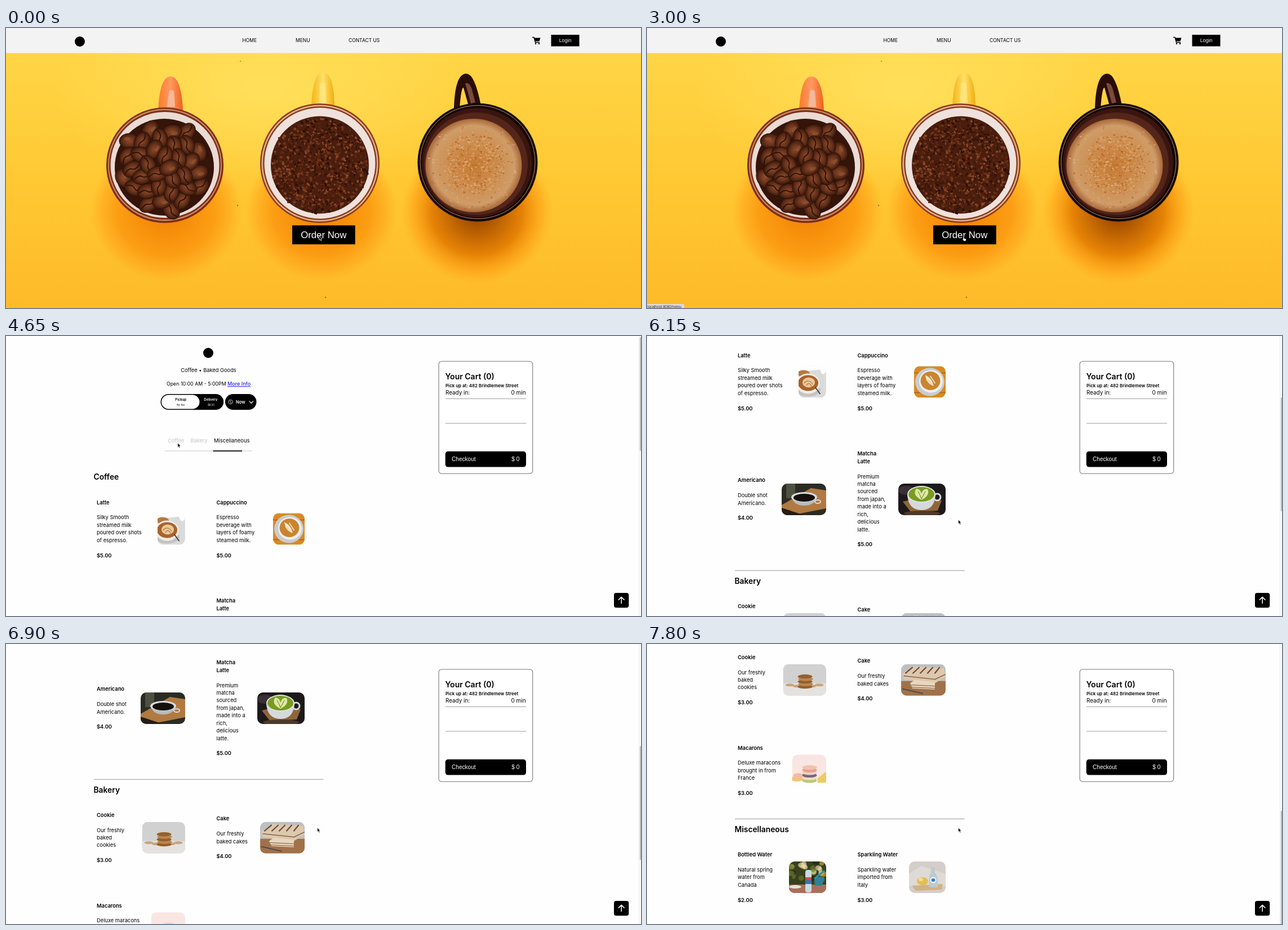
Write an HTML page that moves like this. It is 1127x497 px and loops after 8000 ms.

```html
<!DOCTYPE html>
<html lang="en">
<head>
<meta charset="utf-8">
<title>Coffee shop</title>
<style>
  html, body { margin: 0; width: 100%; height: 100%; overflow: hidden; background: #fefefe; }
  svg { display: block; }
  text { font-family: Inter, "Open Sans", sans-serif; white-space: pre; }
  .b { font-weight: 600; }
  .m { text-anchor: middle; }
  .e { text-anchor: end; }
  .ui { font-family: "Liberation Sans", Arial, sans-serif; }
</style>
</head>
<body>
<svg id="stage" width="1127" height="497" viewBox="0 0 1127 497"></svg>
<script>
const LOOP = 8000, STEP = 150;

let seed = 7;
const rnd = () => (seed = (seed * 16807) % 2147483647) / 2147483647;
const pick = list => list[Math.floor(rnd() * list.length)];
const repeat = (n, make) => Array.from({ length: n }, (_, i) => make(i)).join('');

// Shape helpers; text is placed by its vertical centre.
const rect = (x, y, w, h, fill, r = 0, more = '') =>
  `<rect x="${x}" y="${y}" width="${w}" height="${h}" fill="${fill}" rx="${r}" ${more}/>`;
const oval = (x, y, rx, ry, fill, more = '') =>
  `<ellipse cx="${x}" cy="${y}" rx="${rx}" ry="${ry}" fill="${fill}" ${more}/>`;
const path = (d, fill, more = '') => `<path d="${d}" fill="${fill}" ${more}/>`;
const line = (d, color, width = 1) =>
  path(d, 'none', `stroke="${color}" stroke-width="${width}" stroke-linecap="round" stroke-linejoin="round"`);
const text = (x, y, str, size = 9.3, cls = '', fill = '#000', more = '') =>
  `<text x="${x}" y="${y + size * .36}" font-size="${size}" class="${cls}" fill="${fill}" ${more}>${str}</text>`;
const group = (id, body) => `<g id="${id}">${body}</g>`;
const inDisc = (cx, cy, rx, ry, make) => {
  const a = rnd() * 2 * Math.PI, q = Math.sqrt(rnd());
  return make(cx + rx * q * Math.cos(a), cy + ry * q * Math.sin(a));
};

const gradient = (id, stops) => `<radialGradient id="${id}">${stops.map(([at, color, alpha = 1]) =>
  `<stop offset="${at}" stop-color="${color}" stop-opacity="${alpha}"/>`).join('')}</radialGradient>`;
const defs = `<defs>
  <linearGradient id="wall" x2="0" y2="1"><stop stop-color="#ffd546"/><stop offset=".45" stop-color="#ffca35"/><stop offset="1" stop-color="#feba29"/></linearGradient>
  <linearGradient id="orange"><stop stop-color="#fb7a2c"/><stop offset=".5" stop-color="#ff9a62"/><stop offset="1" stop-color="#f0601c"/></linearGradient>
  <linearGradient id="yellow"><stop stop-color="#f4b413"/><stop offset=".5" stop-color="#ffe069"/><stop offset="1" stop-color="#f2ac0c"/></linearGradient>
  ${gradient('glow', [[0, '#ffe463', .75], [1, '#ffe463', 0]])}
  ${gradient('shade', [[0, '#ef7a00', .95], [.65, '#fb950d', .8], [.85, '#ffa41a', .55], [1, '#ffae20', 0]])}
  ${gradient('darkShade', [[0, '#8a3b00'], [.6, '#e37b00', .9], [.85, '#ff9f14', .55], [1, '#ffae20', 0]])}
  ${gradient('foam', [[0, '#c67a34'], [.5, '#cc8d50'], [.85, '#cf9c68'], [1, '#a8683a']])}
  ${gradient('bean', [[0, '#8b4a2a'], [.6, '#64301a'], [1, '#3a180b']])}
</defs>`;

function bean(i) {
  const a = i * 2.4, q = 78 * Math.sqrt((i + .5) / 34);
  const x = 280 + q * Math.cos(a), y = 248 + q * Math.sin(a);
  return `<g transform="translate(${x} ${y}) rotate(${rnd() * 180})">` +
    oval(0, 0, 18, 13.5, 'url(#bean)', 'stroke="#2b1007" stroke-width=".8"') +
    (rnd() < .6 ? line('M-15 1Q-5 -5 0 0T15 -1', '#2b1007', 1.8) : oval(-4, -4, 6, 3, '#a5633f', 'opacity=".45"')) + '</g>';
}

const dot = (x, y) => oval(x, y, .6 + rnd() * 1.8, .6 + rnd() * 1.2, pick(['#e0a45f', '#b5651f', '#dfb387', '#c47a2c']), 'opacity=".75"');
const crumb = (x, y) => rect(x, y, 1.5 + rnd() * 4, 1.5 + rnd() * 3, pick(['#3a170b', '#5d2711', '#74351a', '#8d4826', '#2c1008']), 0,
  `transform="rotate(${rnd() * 90} ${x} ${y})"`);

const photoWall = rect(0, 44, 1127, 453, 'url(#wall)') +
  oval(460, 110, 380, 180, 'url(#glow)') +
  oval(284, 325, 135, 125, 'url(#shade)') + oval(560, 325, 135, 125, 'url(#shade)') + oval(836, 325, 135, 130, 'url(#darkShade)') +
  oval(416, 59, 1, 1, '#a67b1c') + oval(411, 315, 1, 1, '#7a4a10') + oval(567, 478, 1, 1, '#7a4a10');

const beansCup = path('M270 146Q273 86 292 86T314 146Z', 'url(#orange)') +
  path('M286 140L289 112Q293 108 298 112L300 140Z', '#f5b89a') +
  oval(282, 243.5, 104, 102.5, '#7c2d14') + oval(282, 243, 101, 99.5, '#c98a66') + oval(282, 243, 99, 97, '#7c2d14') +
  oval(282, 243, 96.5, 94, '#eadbd5') + oval(281, 247, 88, 86, '#35140a') + repeat(34, i => bean(33 - i));

const groundsCup = path('M542 140Q544 79 563 79T583 140Z', 'url(#yellow)') +
  path('M555 136L557 98Q562 93 567 98L569 136Z', '#ffe98c', 'opacity=".6"') +
  oval(557, 240, 106, 106, '#8b3a18') + oval(557, 240, 103.5, 103.5, '#e2b493') + oval(557, 240, 101, 101, '#8b3a18') +
  oval(557, 240, 98.5, 98.5, '#efe2dc') + oval(557, 243, 87, 86.5, '#4a1e0e') +
  repeat(1100, () => inDisc(556, 242, 85, 84, crumb));

const creamCup = path('M795 142Q797 81 817 81Q832 81 843 138L822 142L812 106Q808 104 805 142Z', '#2a0d08') +
  path('M815 98Q822 96 826 106L833 132L825 134Z', '#7b4a3c') +
  oval(837, 238.5, 106.5, 105, '#160706') + oval(837, 238, 102, 100.5, 'none', 'stroke="#b58a78" stroke-width="1"') +
  oval(836, 239, 98, 97, '#3a1510') + oval(834, 241, 92, 91, '#54261a') +
  oval(830, 244, 85.5, 83, 'url(#foam)') + repeat(500, () => inDisc(832, 242, 54, 54, dot)) +
  repeat(160, () => inDisc(830, 244, 82, 80, dot));

const cartIcon = line('M934.5 16.5H937L939.5 25.5H946.5', '#000', 1.5) +
  path('M937 17.5H948.5L946.5 23.5H939Z', '#000') + oval(940, 27.8, 1.3, 1.3, '#000') + oval(946, 27.8, 1.3, 1.3, '#000');
const logo = (x, y) => oval(x, y, 9, 9, '#000');

const home = photoWall + beansCup + groundsCup + creamCup +
  rect(0, 0, 1127, 44.5, '#f3f3f3') + logo(131, 24) +
  text(419.5, 22, 'HOME', 8.5) + text(514, 22, 'MENU', 8.5) + text(608, 22, 'CONTACT US', 8.5) +
  cartIcon + rect(967.5, 12, 50, 20.5, '#000') + text(992.5, 22, 'Login', 8.9, 'm ui', '#fff') +
  rect(508, 350.3, 111.7, 33.7, '#000') + text(563.7, 367, 'Order Now', 16.8, 'm ui', '#fff');

let photoCount = 0;
function photo(x, y, w, body) {
  const id = 'clip' + photoCount++;
  return `<clipPath id="${id}">${rect(0, 0, w, 56, '#000', 10)}</clipPath>` +
    `<g transform="translate(${x} ${y})"><g clip-path="url(#${id})">${body}</g></g>`;
}

const latte = rect(0, 0, 49, 56, '#dadadb') + path('M0 0H49V10Q42 20 38 6L20 8L0 10Z', '#fefefe') +
  oval(9, 13, 11, 6, '#b87842') + oval(17, 42, 22, 12, '#c4c3c3') + oval(17, 31, 21, 18, '#f1ece6') +
  oval(17, 30, 18, 14, '#a9632b') + oval(18, 29, 11, 9, '#e9c79c') + line('M10 30Q18 22 25 32M14 34Q19 27 23 36', '#b77639', 1.2) +
  line('M30 38L38 49', '#4a403a', 2);
const cappuccino = rect(0, 0, 56, 56, '#d98a25') + line('M0 12H56M0 47H56', '#a8621a', 1.5) +
  oval(28, 28, 26, 25, '#c9ccd0') + oval(30, 27, 21, 20, '#f0efec') + oval(29, 26, 17.5, 16.5, '#c98530') +
  path('M20 16Q31 20 35 35Q22 32 20 16Z', '#f6e8cc') + line('M29 18L37 30M23 25L33 33', '#f0d9b0', 2);
const americano = rect(0, 0, 79, 56, '#2c2b23') + rect(8, 0, 16, 26, '#4d5140') + path('M0 38L52 8L79 12V44L18 56H0Z', '#b07a42') +
  path('M0 43L40 56H0Z', '#241c16') + path('M18 25Q22 39 40 39T62 25Z', '#b9bbbd') + oval(64, 32, 5, 3, 'none', 'stroke="#dadada" stroke-width="2"') +
  oval(40, 24, 23, 9, '#d9dbdc') + oval(40, 25, 19, 7, '#15100d');
const matcha = rect(0, 0, 84, 56, '#1d191b') + oval(14, 12, 14, 8, '#393036') + path('M8 32L40 24L77 30L70 48L22 50Z', '#8f6538') +
  oval(42, 53, 32, 5, '#4d3928') + path('M16 20Q18 47 41 47T66 20Z', '#d4d9dc') + oval(69, 24, 6, 6, 'none', 'stroke="#d4d9dc" stroke-width="3"') +
  oval(41, 19, 25, 15, '#e0e5e0') + oval(41, 19, 23, 13, '#7a9b22') + path('M41 29Q24 20 32 9Q40 10 41 18Q44 8 52 10Q57 21 41 29Z', '#dce7a9') +
  line('M35 14Q39 20 41 27Q45 20 48 14', '#7a9b22', 1.2);
const cookies = rect(0, 0, 77, 56, '#d1d1d1') + rect(0, 34, 77, 22, '#e4e2df') +
  repeat(5, i => oval(12 + i * 13, 37 + i % 2 * 2, 8, 2.5, '#c9a27d')) +
  repeat(5, i => oval(39 + i % 2, 40 - i * 4.5, 13, 3.6, i % 2 ? '#bd854e' : '#93602f'));
const cake = rect(0, 0, 79, 56, '#bdc0c2') + path('M0 30H79V56H0Z', '#a17149') + path('M2 17L22 4L76 7L79 22L60 34L4 27Z', '#dcc8ad') +
  repeat(5, i => line(`M${8 + i * 13} 16L${20 + i * 12} 6`, '#6f4a37', 2.2)) + line('M5 21L60 27L79 18', '#8b6246', 1.5) +
  path('M16 34L24 28L60 32V45L20 43Z', '#e7d7bf') + line('M18 37L60 39M18 41L60 43', '#956a48', 1.3) + line('M3 44L38 52', '#4a4c54', 2);
const macarons = rect(0, 0, 61, 56, '#f9e5e1') + rect(0, 44, 61, 12, '#fefdfb') + path('M45 43L60 30L61 50H45Z', '#eecb62') +
  oval(9, 43, 12, 5, '#f0c777') + oval(11, 37, 9, 4, '#f4b9a4') +
  ['#b9c779', '#e8dfc4', '#7d6474', '#ead1ca', '#e8a18f', '#f4c0b0'].map((c, i) => oval(31, 46 - i * 4.6, 13, 4, c)).join('');
const bottled = rect(0, 0, 66, 56, '#39401f') + repeat(26, () => oval(rnd() * 66, rnd() * 36, 3 + rnd() * 4, 3 + rnd() * 4,
  pick(['#d3a82b', '#20290f', '#6e7a29', '#ece1b3']), 'opacity=".65"')) + rect(0, 41, 66, 15, '#a8705a') +
  oval(11, 45, 11, 3, '#e6e3df') + path('M45 28H62L59 43H46Z', '#2b829b') + line('M46 30L62 17', '#2f8fa8', 3) +
  rect(29, 15, 11, 40, '#c8dce6', 4) + rect(29, 28, 11, 12, '#d04a43') + rect(30, 33, 9, 7, '#3476a9');
const sparkling = rect(0, 0, 65, 56, '#d3cec9') + path('M0 22L22 8L65 22V44H0Z', '#dedad5') + path('M5 43L60 40L58 50L12 52Z', '#d2b184') +
  oval(24, 35, 10, 7, '#e3bf55') + oval(21, 32, 4, 3, '#f2df91') + path('M39 10H46V20Q52 25 51 46H36Q34 26 39 20Z', '#bdcbd0') +
  oval(43, 33, 5.5, 5.5, '#eef3f4') + oval(43, 33, 3.5, 3, '#3a82bd');

// A card is one run of evenly spaced lines: title, gap, description, gap, price.
function card(x, y, title, about, price) {
  const rows = [...title.split('|').map(s => [s, 'b']), [''], ...about.split('|').map(s => [s, '']), [''], [price, 'b']];
  return rows.map(([s, cls], i) => s && text(x, y + i * 13.42, s, 9.3, cls)).join('');
}
const heading = (y, str) => text(155.5, y, str, 13.8, 'b');
const divider = y => rect(156, y, 407.5, 1, '#999');

const page = logo(359, 30) + text(359.5, 60.5, 'Coffee • Baked Goods', 9.3, 'm') +
  text(285, 85, 'Open 10:00 AM - 5:00PM', 8.8) + text(393, 85, 'More Info', 9.1, '', '#0000ee', 'text-decoration="underline"') +
  rect(274.5, 103, 111.7, 28, '#000', 14) + rect(276, 104.5, 67.5, 25, '#fff', 12.5) +
  text(310.2, 112.5, 'Pickup', 6, 'b m') + text(310.2, 122, 'No fee', 4.4, 'm') +
  text(363.3, 112.5, 'Delivery', 6, 'b m', '#fff') + text(364, 122, '$8.50', 4.4, 'm', '#fff') +
  rect(389, 103, 55.5, 28, '#000', 14) + oval(398.5, 117, 3.8, 3.8, 'none', 'stroke="#fff" stroke-width=".7"') +
  line('M398 114.5V117.5L400 118.5', '#fff', .7) + text(408, 117, 'Now', 7.5, 'b', '#fff') + line('M432 115.8L435.3 119.3L438.6 115.8', '#fff', 1.2) +
  text(287, 185.5, 'Coffee', 9.2, '', '#c4c4c4') + text(327.5, 185.5, 'Bakery', 9.2, '', '#c4c4c4') + text(369, 185.5, 'Miscellaneous', 9.4) +
  rect(281.5, 203.5, 156, 1, '#ccc') + rect(367.5, 203.2, 51.5, 1.7, '#000') +
  heading(250.5, 'Coffee') +
  card(161, 295.3, 'Latte', 'Silky Smooth|streamed milk|poured over shots|of espresso.', '$5.00') + photo(269, 314.5, 48.8, latte) +
  card(373.5, 295.3, 'Cappuccino', 'Espresso|beverage with|layers of foamy|steamed milk.', '$5.00') + photo(474, 314.5, 56, cappuccino) +
  card(161, 517, 'Americano', 'Double shot|Americano.', '$4.00') + photo(239, 523, 79, americano) +
  card(373.5, 470, 'Matcha|Latte', 'Premium|matcha|sourced|from japan,|made into a|rich,|delicious|latte.', '$5.00') + photo(446, 523, 84, matcha) +
  divider(676.8) + heading(695.8, 'Bakery') +
  card(161, 740.4, 'Cookie', 'Our freshly|baked|cookies', '$3.00') + photo(241.5, 752.7, 76.5, cookies) +
  card(373.5, 747, 'Cake', 'Our freshly|baked cakes', '$4.00') + photo(451, 752.7, 79, cake) +
  card(161, 901.3, 'Macarons', 'Deluxe maracons|brought in from|France', '$3.00') + photo(257.5, 913.3, 60.5, macarons) +
  divider(1027) + heading(1046, 'Miscellaneous') +
  card(161, 1090.7, 'Bottled Water', 'Natural spring|water from|Canada', '$2.00') + photo(252, 1103, 66, bottled) +
  card(373.5, 1090.7, 'Sparkling Water', 'Sparkling water|imported from|Italy', '$3.00') + photo(465, 1103, 65, sparkling);

const cart = rect(768.1, 45, 166.6, 199.3, '#fff', 5, 'stroke="#777" stroke-width="1.1"') +
  text(779.5, 72, 'Your Cart (0)', 14, 'b') + text(780, 87.7, 'Pick up at: 482 Brindlemew Street', 7.9, 'b') +
  text(780, 100.7, 'Ready in:', 9.9) + text(922.5, 100.7, '0 min', 9.9, 'e') +
  rect(780, 110.8, 143, 1, '#999') + rect(780, 154.5, 143, 1, '#999') +
  rect(779.7, 204.8, 143.3, 27.8, '#000', 5) + text(791, 218.5, 'Checkout', 10.1, 'ui', '#fff') + text(911.3, 218.5, '$ 0', 10.1, 'e ui', '#fff');

const overlay = rect(1123, 0, 4, 497, '#fafafa') + rect(1122.8, 0, .6, 497, '#e6e6e6') +
  rect(1124.8, 2, 2.2, 202, '#bdbdbd', 1, 'id="thumb"') +
  rect(1079, 456, 26.3, 26.3, '#000', 4) + line('M1092.2 474.5V463.5M1087.3 468.3L1092.2 463.4L1097.1 468.3', '#fff', 1.5);

const status = rect(-2, 490, 68, 9, '#dcdae0', 2, 'id="statusBox"') + text(1, 494.8, 'localhost:8080/menu', 6.5, 'ui', '#333');
const outline = 'stroke-width=".7" stroke-linejoin="round"';
const arrow = path('M0 0V7.8L1.8 6.2L3.2 9.2L4.5 8.6L3.2 5.7H5.5Z', '#000', `stroke="#fff" ${outline}`);
const hand = path('M2.3 .4Q3.3 .4 3.3 1.4V4L6.5 4.6Q7.4 4.9 7.2 5.8L6.5 8.8H2.7L.4 5.7Q.5 4.6 1.4 5.2V1.4Q1.4 .4 2.3 .4Z', '#fff', `stroke="#000" ${outline}`);

stage.innerHTML = defs + group('home', home) + group('menu', group('page', page) + cart + overlay) +
  group('status', status) + group('pointer', group('arrow', arrow) + group('hand', hand));

const pointerKeys = [[900, 555.5, 368.5], [1050, 562, 356], [1200, 588, 333], [1350, 601, 322], [1500, 590, 333], [1650, 567, 349],
  [1800, 550, 361], [1950, 558.5, 360], [2100, 560, 362], [2250, 560, 362], [2700, 559.5, 369.3], [3450, 559.5, 369.6],
  [3750, 505, 335], [4200, 335, 210], [4500, 304.7, 189.8], [4650, 304.7, 189.8], [4800, 340, 210], [5100, 552.5, 326]];
const scrollKeys = [[4950, 0], [5100, 15], [5250, 70], [5400, 150], [5550, 210], [5850, 250], [6150, 261], [6300, 305], [6450, 375],
  [6600, 405], [6750, 405], [6900, 437], [7050, 515], [7200, 550], [7350, 550], [7500, 605], [7650, 690], [7800, 717]];

function track(keys, t) {
  const next = keys.findIndex(k => k[0] > t);
  if (next < 1) return (next ? keys[keys.length - 1] : keys[0]).slice(1);
  const a = keys[next - 1], b = keys[next], u = (t - a[0]) / (b[0] - a[0]);
  return a.slice(1).map((v, i) => v + (b[i + 1] - v) * u);
}

const el = id => document.getElementById(id);
const show = (id, on) => el(id).setAttribute('display', on ? 'inline' : 'none');
const move = (id, x, y) => el(id).setAttribute('transform', `translate(${x} ${y})`);

function draw(now) {
  const t = Math.floor((now % LOOP) / STEP) * STEP;
  const [scroll] = track(scrollKeys, t), [x, y] = track(pointerKeys, t);
  const onMenu = t >= 3150, overLink = t >= 1800 && t < 3600;
  show('home', !onMenu);
  show('menu', onMenu);
  show('status', t >= 3000 && t < 3300);
  show('statusBox', !onMenu);
  el('status').setAttribute('opacity', onMenu ? .2 : 1);
  show('arrow', !overLink);
  show('hand', overLink);
  move('pointer', x, y);
  move('page', 0, -scroll);
  move('thumb', 0, scroll * .41);
  requestAnimationFrame(() => draw(performance.now()));
}
draw(0);
</script>
</body>
</html>
```
